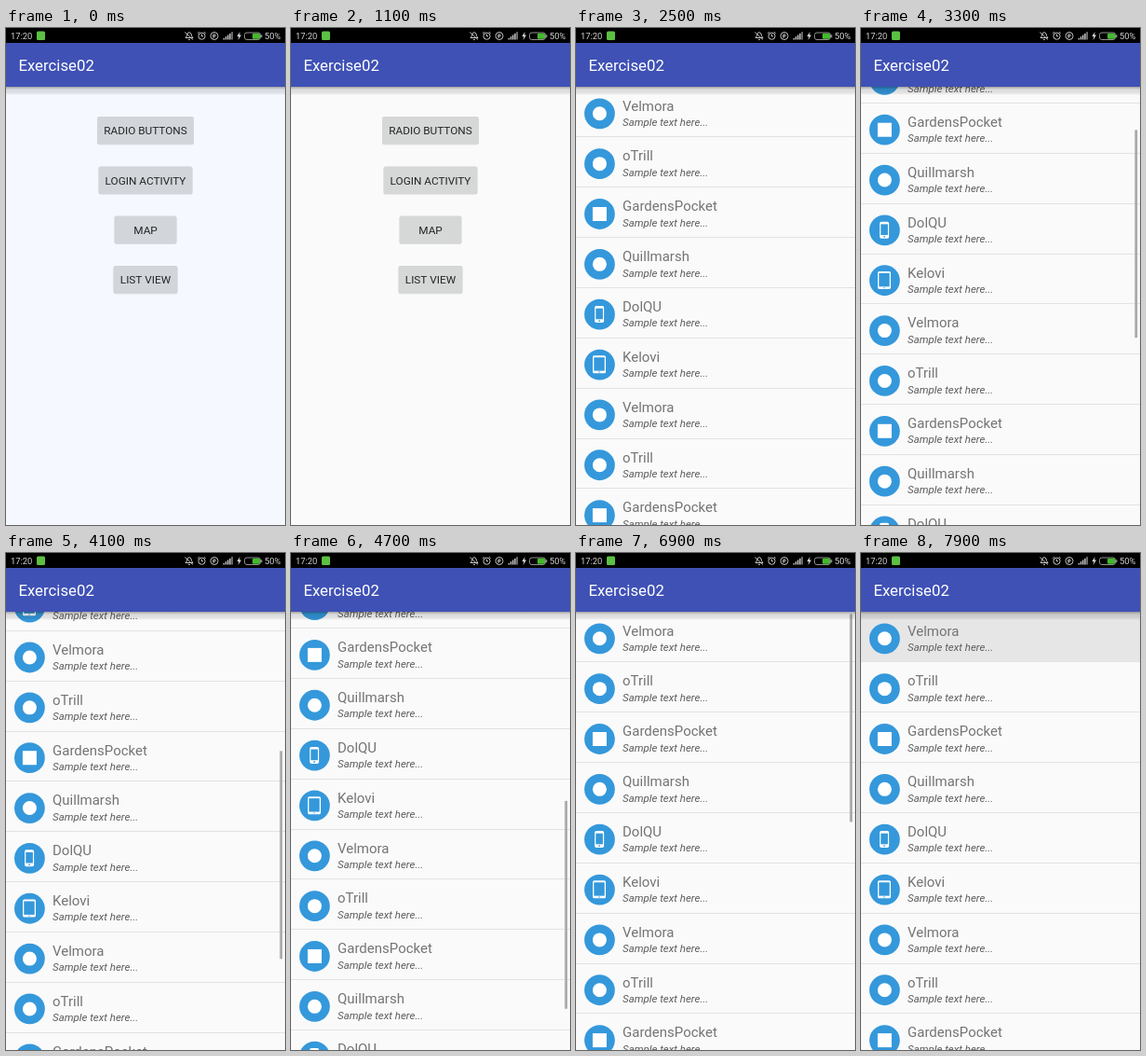
An HTML page with a canvas that plays this animation: 300x533 px, repeating every 8000 ms.

```html
<!DOCTYPE html>
<html lang="en">
<head>
<meta charset="utf-8">
<title>List demo</title>
<style>
html, body { margin: 0; width: 100%; height: 100%; overflow: hidden; background: #fafafa; }
canvas { display: block; width: 300px; height: 533px; }
</style>
</head>
<body>
<canvas id="stage"></canvas>
<script>
const W = 300, H = 533, LOOP = 8000;
const TOP = 63, PITCH = 53.85, ROWS = 18;
const VIEW = H - TOP, CONTENT = ROWS * PITCH, REST = 422.4;
const FONT = 'Roboto, sans-serif';

const items = [
  ['Velmora', 'disc'], ['oTrill', 'disc'], ['GardensPocket', 'square'],
  ['Quillmarsh', 'disc'], ['DolQU', 'phone'], ['Kelovi', 'tablet']
];
const buttons = [
  ['RADIO BUTTONS', 104, 110], ['LOGIN ACTIVITY', 101, 163.4],
  ['MAP', 67, 216.6], ['LIST VIEW', 69, 270]
];

const canvas = document.getElementById('stage');
const ctx = canvas.getContext('2d');
const ratio = window.devicePixelRatio || 1;
canvas.width = W * ratio;
canvas.height = H * ratio;

function rect(x, y, w, h, color) {
  ctx.fillStyle = color;
  ctx.fillRect(x, y, w, h);
}

function round(x, y, w, h, r, color) {
  ctx.fillStyle = color;
  ctx.beginPath();
  ctx.roundRect(x, y, w, h, r);
  ctx.fill();
}

function disc(x, y, r, color) {
  ctx.fillStyle = color;
  ctx.beginPath();
  ctx.arc(x, y, r, 0, Math.PI * 2);
  ctx.fill();
}

function ring(x, y, r) {
  ctx.beginPath();
  ctx.arc(x, y, r, 0, Math.PI * 2);
  ctx.stroke();
}

function path(points, close) {
  ctx.beginPath();
  points.forEach(([x, y]) => ctx.lineTo(x, y));
  if (close) ctx.closePath();
}

function line(...points) {
  path(points);
  ctx.stroke();
}

function text(str, x, y, style, color, align = 'left') {
  ctx.font = style + ' ' + FONT;
  ctx.fillStyle = color;
  ctx.textAlign = align;
  ctx.fillText(str, x, y);
}

function ease(t, from, to) {
  const p = Math.min(1, Math.max(0, (t - from) / (to - from)));
  return p * p * (3 - 2 * p);
}

function scrollAt(t) {
  return REST * (ease(t, 2620, 4900) - ease(t, 5700, 6900));
}

function statusBar() {
  rect(0, 0, W, 16, '#000');
  text('17:20', 5, 12, '9.4px', '#d4d4d4');
  round(33, 3.5, 9, 9.5, 1.5, '#5cc043');

  ctx.strokeStyle = '#c4c4c4';
  ctx.lineWidth = 1;
  // muted bell
  path([[193, 10.5], [194.5, 8.5], [195, 6], [197, 4.5], [199, 6], [199.5, 8.5], [201, 10.5]], true);
  ctx.stroke();
  line([196, 12.4], [198, 12.4]);
  line([192.5, 4.5], [201, 12.5]);
  // alarm clock
  ring(210.5, 8.7, 3.6);
  line([210.5, 6.6], [210.5, 8.9], [212, 8.9]);
  line([206.3, 5.8], [208, 4.2]);
  line([213, 4.2], [214.7, 5.8]);
  // circled mark
  ring(224, 8.5, 4);
  ring(224, 8, 1.2);
  line([223, 8], [223, 10.8]);

  for (let i = 0; i < 5; i++) {
    const h = 1.6 + i * 1.7;
    rect(233.5 + i * 2.2, 12.5 - h, 1.6, h, i < 4 ? '#b8b8b8' : '#808080');
  }
  path([[251.6, 4], [248.4, 9], [250.4, 9], [249.6, 13], [253, 7.6], [251, 7.6]], true);
  ctx.fillStyle = '#dcdcdc';
  ctx.fill();

  ctx.strokeStyle = '#909090';
  ctx.beginPath();
  ctx.roundRect(256.5, 5, 17, 7.5, 2.5);
  ctx.stroke();
  rect(274, 7.2, 1.4, 3, '#909090');
  round(265, 5.8, 8, 6, 1.2, '#45b82c');
  text('50%', 278, 12, '9.4px', '#d4d4d4');
}

function appBar() {
  const shade = ctx.createLinearGradient(0, TOP, 0, TOP + 9);
  shade.addColorStop(0, 'rgba(0,0,0,.36)');
  shade.addColorStop(.3, 'rgba(0,0,0,.13)');
  shade.addColorStop(.75, 'rgba(0,0,0,.09)');
  shade.addColorStop(1, 'rgba(0,0,0,0)');
  rect(0, TOP, W, 9, shade);
  rect(0, 16, W, TOP - 16, '#3f51b5');
  text('Exercise02', 13.4, 46, '16.8px', '#fff');
}

function menu(tinted) {
  rect(0, TOP, W, VIEW, tinted ? '#f5f9ff' : '#fafafa');
  for (const [label, w, y] of buttons) {
    const x = 150 - w / 2;
    round(x, y - 14.6, w, 30, 2, 'rgba(0,0,0,.08)');
    round(x, y - 15, w, 29.8, 2, tinted ? '#d2d6db' : '#d6d7d7');
    text(label, 150, y + 4.4, '11.8px', '#242424', 'center');
  }
}

function icon(kind, x, y) {
  const blue = '#3498db';
  disc(x, y, 16.4, blue);
  if (kind === 'disc') disc(x, y, 7.5, '#fff');
  if (kind === 'square') rect(x - 7.5, y - 7.5, 15, 15, '#fff');
  if (kind === 'phone') {
    round(x - 5.3, y - 9.2, 10, 18, 1.8, '#fff');
    rect(x - 4.1, y - 6.5, 7.6, 11.6, blue);
    disc(x - .3, y + 6.9, .9, blue);
  }
  if (kind === 'tablet') {
    round(x - 7.4, y - 9.8, 14, 19, 1.6, '#fff');
    rect(x - 6.1, y - 7.8, 11.4, 14.4, blue);
    disc(x - .4, y + 7.9, .7, blue);
  }
}

function scrollbar(t, scroll) {
  if (t < 2900 || t >= 7500) return;
  // the thumb fades while the list rests
  const faded = t < 5900 ? ease(t, 5200, 6300) : ease(t, 7000, 7500);
  ctx.globalAlpha = 1 - faded;
  rect(294.4, TOP + 2.5 + scroll / CONTENT * VIEW, 2.8, VIEW * VIEW / CONTENT - 5, '#a9a9a9');
  ctx.globalAlpha = 1;
}

function list(t) {
  const scroll = scrollAt(t);
  rect(0, TOP, W, VIEW, '#fafafa');
  for (let i = 0; i < ROWS; i++) {
    const y = 63.2 + i * PITCH - scroll;
    if (y > H || y + PITCH < TOP) continue;
    const [name, kind] = items[i % items.length];
    if (i === 0 && t >= 7700) rect(0, y, W, PITCH, '#e6e6e6');
    icon(kind, 25.4, y + 28.6);
    text(name, 50, y + 25.4, '15px', '#747474');
    text('Sample text here...', 50, y + 41.8, 'italic 11.5px', '#5c5c5c');
    rect(0, Math.round(y + PITCH - .6), W, 1, '#e0e2e4');
  }
  scrollbar(t, scroll);
}

function draw(now) {
  const time = now % LOOP;
  const t = time < 500 ? 0 : 500 + Math.floor((time - 500) / 200) * 200;
  ctx.setTransform(ratio, 0, 0, ratio, 0, 0);
  if (t < 1700) menu(t < 500);
  else list(t);
  appBar();
  statusBar();
}

let start;
function tick(now) {
  if (start === undefined) start = now;
  draw(now - start);
  requestAnimationFrame(tick);
}
draw(0);
requestAnimationFrame(tick);
</script>
</body>
</html>
```
